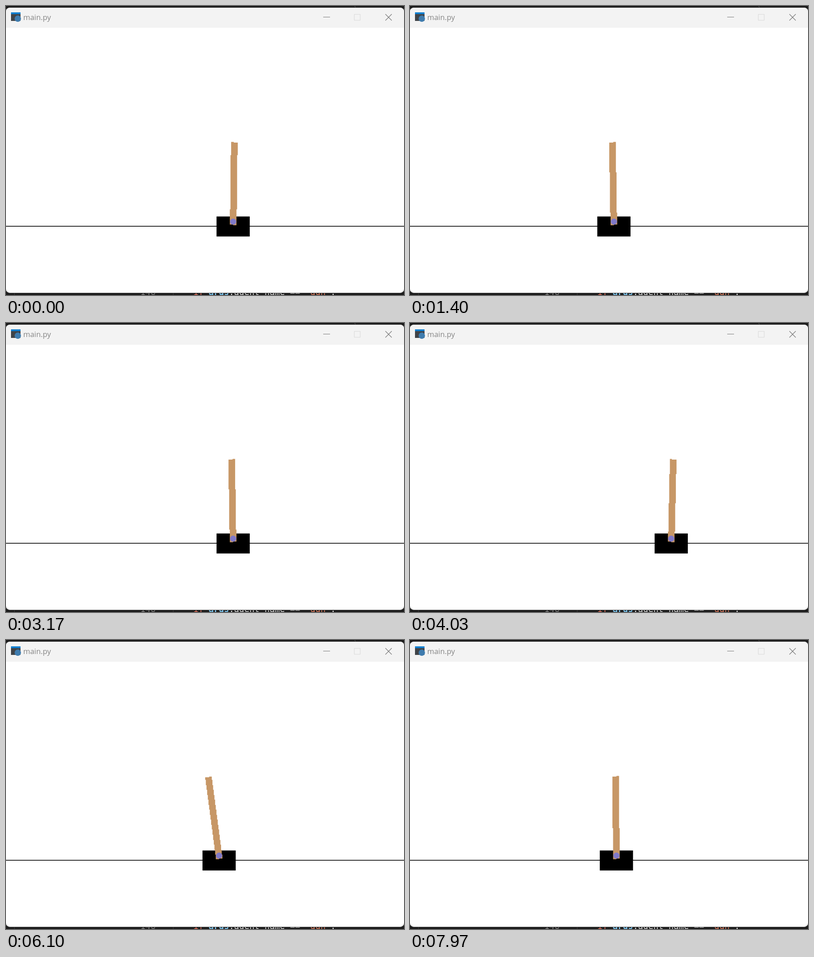
An HTML page for the animation above (8000 ms loop, 877x639 px).

```html
<!DOCTYPE html>
<html lang="en">
<head>
<meta charset="utf-8">
<title>Cart and pole</title>
<style>
  html, body { margin: 0; width: 100%; height: 100%; overflow: hidden; background: #1c1c1c; }
  svg { display: block; width: 877px; height: 639px; }
  .code { font: 18.6px "DejaVu Sans Mono", monospace; white-space: pre; fill: #d4d4d4; }
  .title { font: 16.4px "Open Sans", sans-serif; fill: #858585; }
</style>
</head>
<body>
<svg viewBox="0 0 877 639">
  <rect width="877" height="639" fill="#1c1c1c"/>
  <path d="M768 0l3 4" stroke="#555"/>
  <path d="M18.5 634v5M368.5 634v5" stroke="#3a3a3a"/>
  <text class="code" x="296" y="639" fill-opacity=".5">146</text>
  <text class="code" x="413" y="639"><tspan fill="#e0705c">if</tspan> <tspan fill="#79c0e8" font-weight="bold">args</tspan>.agent_name == <tspan fill="#d8795c">"dqn"</tspan>:</text>

  <rect x="-.5" y="3.5" width="878" height="631" rx="9" fill="#fff" stroke="#666"/>
  <path d="M0 48V13Q0 4 9 4H868Q877 4 877 13V48Z" fill="#f3f3f3"/>
  <rect x="11" y="14" width="21" height="19" fill="#404448"/>
  <rect x="11" y="14" width="21" height="4" fill="#0f7fd0"/>
  <circle cx="26" cy="28" r="7" fill="#3f7cae"/>
  <text class="title" x="38" y="31">main.py</text>
  <g fill="none" stroke="#777" stroke-width="1.2">
    <path d="M699 24.5H714M836 18L850 32M850 18L836 32"/>
    <rect x="767.5" y="18.5" width="13" height="13" stroke="#ddd"/>
  </g>

  <path d="M0 487H877" stroke="#333" stroke-width="2"/>
  <g id="cart">
    <rect x="-36.6" y="465.4" width="73.2" height="44.2"/>
    <polygon id="pole" fill="#c79766"/>
    <circle cy="476.8" r="6.8" fill="#8079c8"/>
  </g>
</svg>
<script>
const LOOP = 8, FPS = 30;
const SCALE = 877 / 600, AXLE_Y = 476.6;
const HALF_WIDTH = 5, POLE_TOP = 120, POLE_BOTTOM = -5;

// In each episode the cart drifts steadily; after `wait` seconds it also
// accelerates by `push` while the pole turns at `lean` radians per second.
const episodes = [
  { start: 0,    x: 500.5, drift: 90, wait: 0,    push: 191.4, tilt: .0123,  lean: .0655 },
  { start: 1.2,  x: 443.5, drift: 29, wait: 2.18, push: 117,   tilt: -.0164, lean: .06 },
  { start: 5.03, x: 436.4, drift: 31, wait: .7,   push: 0,     tilt: 0,      lean: -.357 },
  { start: 6.17, x: 429.5, drift: 9.5, wait: 1,   push: 13,    tilt: -.0055, lean: 0 }
];

const cart = document.getElementById('cart');
const pole = document.getElementById('pole');

function pose(time) {
  const { start, x, drift, wait, push, tilt, lean } = episodes.findLast(e => time >= e.start);
  const age = time - start, moving = Math.max(0, age - wait);
  return { x: x + drift * age + push * moving ** 2, angle: tilt + lean * moving };
}

// Outline of a rotated bar rasterised row by row on a coarse pixel grid
function polePoints(angle) {
  const sin = Math.sin(angle), cos = Math.cos(angle);
  const left = [], right = [];
  for (let row = POLE_TOP + 1; row >= POLE_BOTTOM - 1; row--) {
    let lo = Math.round((row * sin - HALF_WIDTH) / cos + Math.sign(sin) * .27);
    let hi = lo + 2 * HALF_WIDTH;
    if (Math.abs(sin) > .001) {
      const ends = [(POLE_BOTTOM - row * cos) / sin, (POLE_TOP - row * cos) / sin].sort((a, b) => a - b);
      lo = Math.max(lo, Math.round(ends[0]));
      hi = Math.min(hi, Math.round(ends[1]));
    } else if (row > POLE_TOP || row < POLE_BOTTOM) continue;
    if (lo >= hi) continue;
    for (const edge of [row + .5, row - .5]) {
      const y = AXLE_Y - edge * SCALE;
      left.push([lo * SCALE, y]);
      right.unshift([hi * SCALE, y]);
    }
  }
  return left.concat(right).map(p => p.map(v => v.toFixed(2)).join()).join(' ');
}

function draw(seconds) {
  const frame = Math.floor((seconds + .005) * FPS) % (LOOP * FPS);
  const { x, angle } = pose(frame / FPS);
  cart.setAttribute('transform', `translate(${x.toFixed(2)} 0)`);
  pole.setAttribute('points', polePoints(angle));
}

let begin;
function tick(now) {
  begin ??= now;
  draw((now - begin) / 1000);
  requestAnimationFrame(tick);
}
draw(0);
requestAnimationFrame(tick);
</script>
</body>
</html>
```
